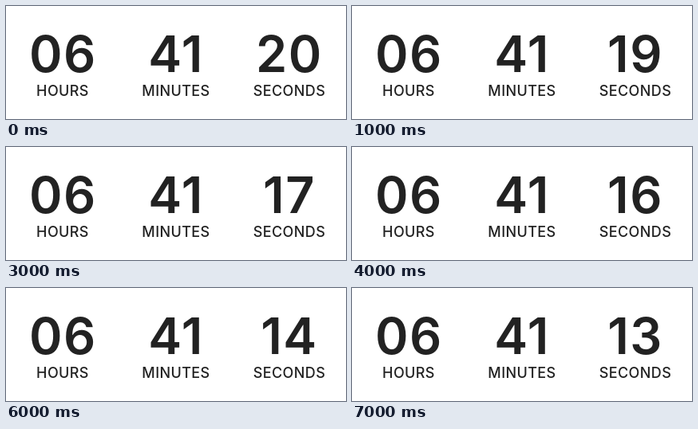
Animation of 426x142 px, one loop 8 s. Source, as an HTML page:

```html
<!DOCTYPE html>
<html lang="en">
<head>
<meta charset="utf-8">
<title>Countdown</title>
<style>
  html, body { margin: 0; height: 100%; overflow: hidden; background: #fff; }
  svg { display: block; width: 426px; height: 142px; }
  text { font-family: Inter, sans-serif; text-anchor: middle; fill: #222; }
  .number { font-size: 63px; font-weight: 560; letter-spacing: 1.5px; }
  .label { font-size: 18px; font-weight: 530; letter-spacing: .4px; }
</style>
</head>
<body>
<svg viewBox="0 0 426 142">
  <text class="number" x="71.5" y="83">06</text>
  <text class="number" x="213" y="83">41</text>
  <text class="number" x="355" y="83" id="seconds">20</text>
  <text class="label" x="71" y="113">HOURS</text>
  <text class="label" x="213" y="113">MINUTES</text>
  <text class="label" x="355" y="113">SECONDS</text>
</svg>
<script>
  const FIRST = 20, STEPS = 8;
  const seconds = document.getElementById('seconds');
  const start = performance.now();

  function draw() {
    const elapsed = Math.max(0, performance.now() - start);
    seconds.textContent = FIRST - Math.floor(elapsed / 1000) % STEPS;
    requestAnimationFrame(draw);
  }
  draw();
</script>
</body>
</html>
```
